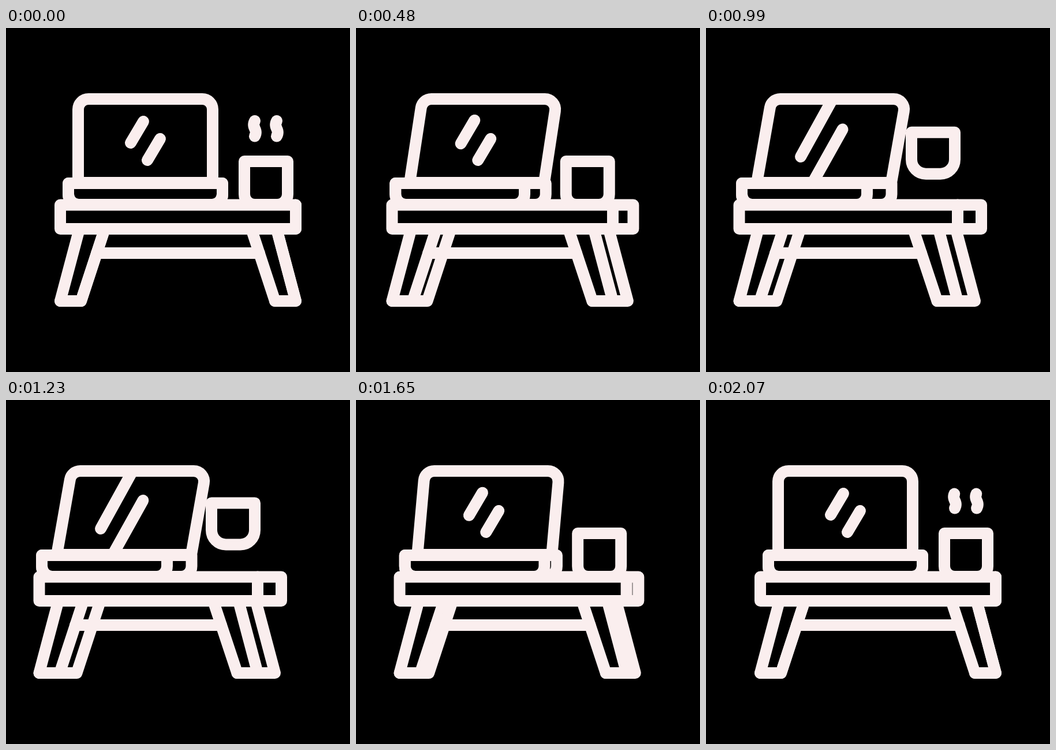
An HTML page with a canvas that plays this animation: 596x596 px, repeating every 2.1 s.

```html
<!DOCTYPE html>
<html lang="en">
<head>
<meta charset="utf-8">
<title>Desk</title>
<style>
html, body { margin: 0; width: 100%; height: 100%; overflow: hidden; background: #000; }
canvas { display: block; }
</style>
</head>
<body>
<canvas id="stage" width="596" height="596"></canvas>
<script>
const ctx = document.getElementById('stage').getContext('2d');
const LOOP = 2100, STEP = 30;

// Eased 0..1 ramp between two times
function ramp(t, from, to) {
  const u = Math.min(1, Math.max(0, (t - from) / (to - from)));
  return u * u * (3 - 2 * u);
}

// Rises during a..b, falls during c..d
const pulse = (t, a, b, c, d) => ramp(t, a, b) - ramp(t, c, d);

function line(...pts) {
  ctx.beginPath();
  for (let i = 0; i < pts.length; i += 2) ctx.lineTo(pts[i], pts[i + 1]);
  ctx.stroke();
}

// Box with square top and rounded bottom corners
function tray(l, r, top, bottom, rad) {
  ctx.beginPath();
  ctx.moveTo(l, top);
  ctx.arcTo(l, bottom, r, bottom, rad);
  ctx.arcTo(r, bottom, r, top, rad);
  ctx.lineTo(r, top);
  ctx.closePath();
  ctx.stroke();
}

function laptop(p) {
  const tl = 125 - 11.5 * p, bl = 125 - 37 * p, w = 233;
  ctx.beginPath();
  ctx.moveTo(bl, 268);
  ctx.arcTo(tl, 123, tl + w, 123, 18);
  ctx.arcTo(tl + w, 123, bl + w, 268, 18);
  ctx.lineTo(bl + w, 268);
  ctx.closePath();
  ctx.stroke();

  const left = 108 - 46 * p;
  tray(left, 375 - 96 * p, 269, 306, 18);
  tray(left, 375 - 53.5 * p, 269, 306, 18);
}

// Slanted reflection, lengthened upwards and downwards
function glare(x, y, up, down) {
  line(x + up * 0.52, y - up, x - 22 - down * 0.54, y + 37 + down);
}

function table(p) {
  const left = 94 - 36.5 * p, split = 502 - 66 * p, right = 502 - 25 * p;
  ctx.strokeRect(left, 306.5, right - left, 41.5);
  line(split, 306.5, split, 348);

  const foot = 94 - 36.5 * p;
  line(127.2 - 36.5 * p, 348, foot, 473, 130 - 37 * p, 473, 171 - 37 * p, 348);
  line(foot, 473, 130 - 7.5 * p, 473, 171 - 7.5 * p, 348);

  const heel = 466 - 65.5 * p;
  line(425 - 66 * p, 348, heel, 473, 502 - 66 * p, 473, 468.8 - 66 * p, 348);
  line(heel, 473, 502 - 36 * p, 473, 468.8 - 36 * p, 348);

  line(157 - 37 * p, 390, 439 - 66 * p, 390);
}

// The cup gets rounder as it leaves the table
function cup(dx, lift) {
  const k = ramp(lift, 0, 18);
  const top = 231 - lift;
  tray(413 + dx, 488 + dx, top, top + 75 - 3 * k, 18 + 7 * k);
}

function steam(x, amount) {
  const n = 20;
  ctx.beginPath();
  for (let i = 0; i <= n; i++) {
    const k = amount * i / n;
    ctx.lineTo(x + 1.8 * Math.sin(2 * Math.PI * k), 187.5 - 26.5 * k);
  }
  ctx.stroke();
}

function draw(t) {
  const p = pulse(t, 65, 605, 1382, 1922);
  const slide = -57 * p;
  const lift = 60 * pulse(t, 640, 1110, 1154, 1500);
  const long1 = pulse(t, 420, 850, 1290, 1695);
  const long2 = pulse(t, 635, 1070, 1220, 1550);

  ctx.fillStyle = '#000';
  ctx.fillRect(0, 0, 596, 596);
  ctx.strokeStyle = '#faeeee';
  ctx.lineWidth = 20;
  ctx.lineCap = ctx.lineJoin = 'round';

  laptop(p);
  const shift = -39 * p;
  glare(238 + shift, 162, 39 * long1, 24 * long1);
  glare(267 + shift, 192, 18 * long2, 40 * long2);

  table(p);
  cup(slide, lift);

  const vapor = t < 1000 ? 1 - ramp(t, 0, 240) : ramp(t, 1815, 2115);
  if (vapor > 0) {
    steam(431 + slide, vapor);
    steam(469 + slide, vapor);
  }
}

const start = performance.now();
function tick() {
  const t = Math.max(0, performance.now() - start) % LOOP;
  draw(Math.floor(t / STEP) * STEP);
  requestAnimationFrame(tick);
}
tick();
</script>
</body>
</html>
```
